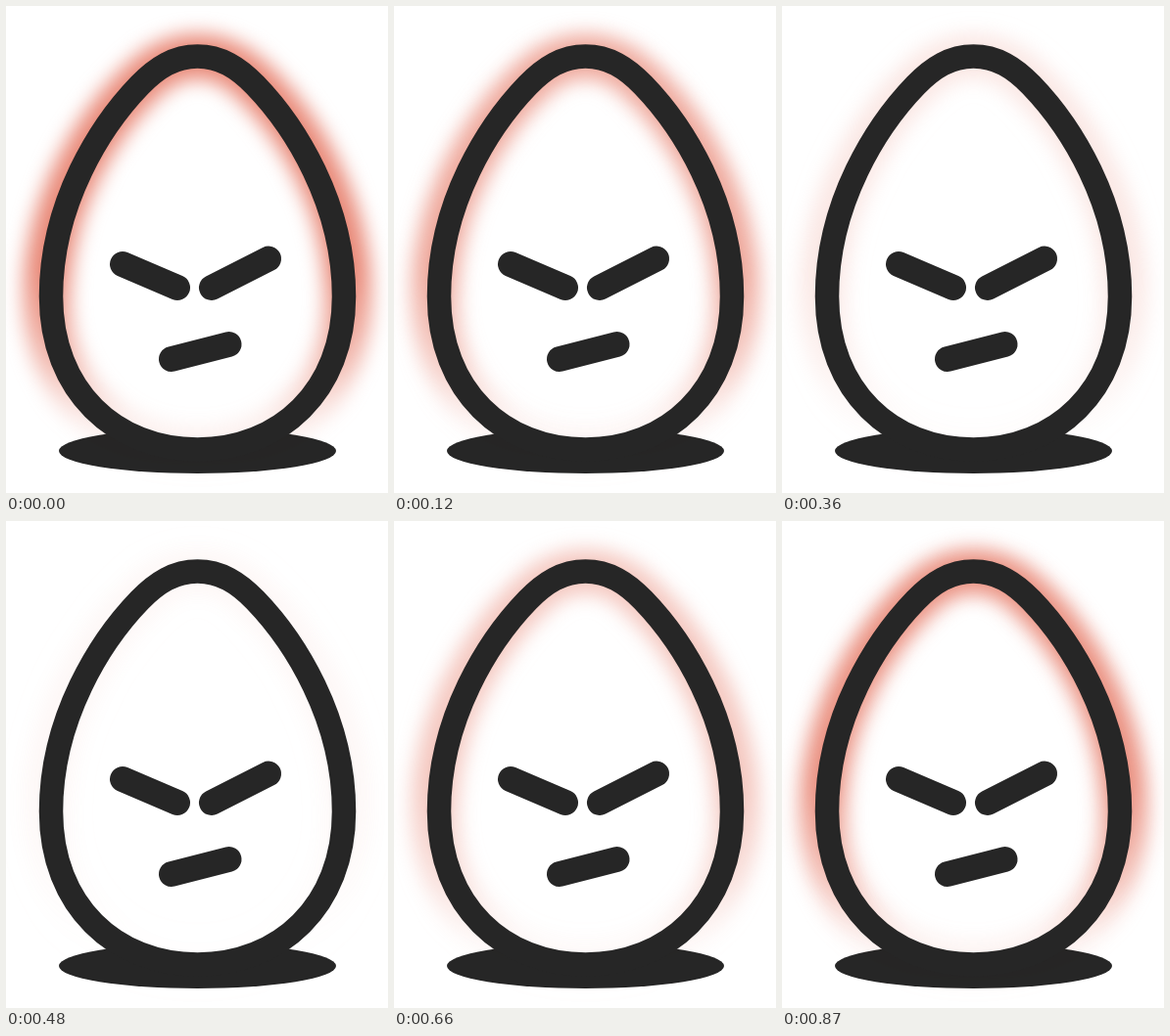
These frames come from a looping animation (390 px wide and 498 px high, 0.9 s). An HTML page with a canvas:

```html
<!DOCTYPE html>
<html lang="en">
<head>
<meta charset="utf-8">
<title>Angry egg</title>
<style>
  html, body { margin: 0; width: 100%; height: 100%; overflow: hidden; background: #fff; }
  canvas { display: block; }
</style>
</head>
<body>
<canvas id="stage" width="390" height="498"></canvas>
<script>
const WIDTH = 390, HEIGHT = 498;
const CENTER = 195.5;
const LOOP = 900, STEP = 30;
const INK = '#262626';
const LINE = 24.5;

const ctx = document.getElementById('stage').getContext('2d');

const egg = new Path2D(
  'M195.5 51.5 C172 51.5 154 63 136.5 81 C97 122 46 201 46 297 ' +
  'C46 394 112 453.5 195.5 453.5 C279 453.5 345 394 345 297 ' +
  'C345 201 294 122 254.5 81 C237 63 219 51.5 195.5 51.5 Z'
);

// Soft red halo, a little wider than the shell, fading out towards the ground
function makeGlow() {
  const layer = document.createElement('canvas');
  layer.width = WIDTH;
  layer.height = HEIGHT;
  const g = layer.getContext('2d');
  const fade = g.createLinearGradient(0, 270, 0, 490);
  [[0, 1], [0.4, 0.6], [0.7, 0.15], [1, 0]].forEach(([at, alpha]) =>
    fade.addColorStop(at, `rgba(233, 138, 121, ${alpha})`));
  g.filter = 'blur(10px)';
  g.translate(CENTER, 0);
  g.scale(1.03, 1);
  g.translate(-CENTER, 0);
  g.strokeStyle = fade;
  g.lineWidth = 46;
  g.stroke(egg);
  return layer;
}

const glow = makeGlow();

function bar(x1, y1, x2, y2) {
  ctx.beginPath();
  ctx.moveTo(x1, y1);
  ctx.lineTo(x2, y2);
  ctx.stroke();
}

function draw(time) {
  const t = Math.floor((time % LOOP) / STEP) * STEP;
  const strength = Math.abs(1 - 2 * t / LOOP);

  ctx.fillStyle = '#fff';
  ctx.fillRect(0, 0, WIDTH, HEIGHT);

  ctx.fillStyle = INK;
  ctx.beginPath();
  ctx.ellipse(CENTER, 455, 141.5, 23, 0, 0, Math.PI * 2);
  ctx.fill();
  ctx.fillStyle = '#fff';
  ctx.fill(egg);

  ctx.save();
  ctx.globalCompositeOperation = 'multiply';
  ctx.globalAlpha = strength;
  ctx.drawImage(glow, 0, 0);
  ctx.restore();

  ctx.strokeStyle = INK;
  ctx.lineCap = 'round';
  ctx.lineWidth = LINE;
  ctx.stroke(egg);

  ctx.lineWidth = 26;
  bar(119, 264, 175, 288);
  bar(210, 288, 268, 258.5);
  bar(169, 361, 227.5, 346);
}

function tick() {
  draw(performance.now());
  requestAnimationFrame(tick);
}
tick();
</script>
</body>
</html>
```
